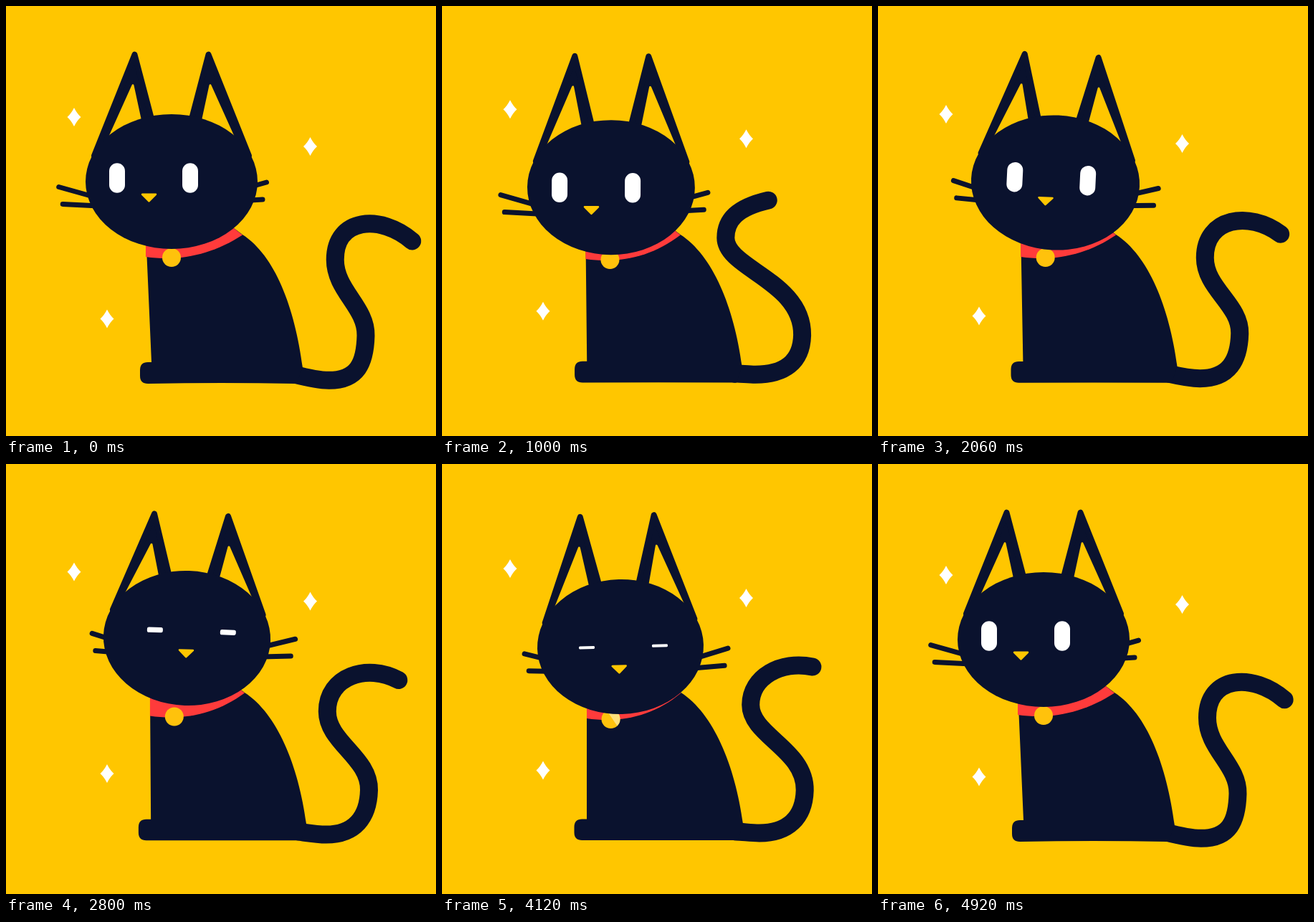
An HTML page with a canvas for the animation above (4.94 s loop, 600 px wide and 600 px high).

```html
<!DOCTYPE html>
<html lang="en">
<head>
<meta charset="utf-8">
<title>Black cat</title>
<style>
html, body { margin: 0; width: 100%; height: 100%; overflow: hidden; background: #ffc600; }
canvas { display: block; width: 600px; height: 600px; }
</style>
</head>
<body>
<canvas id="stage"></canvas>
<script>
const LOOP = 4940, HALF = LOOP / 2;
const YELLOW = '#ffc600', INK = '#0a122e', RED = '#ff3b3b', GOLD = '#ffc20c', WHITE = '#fff';

const canvas = document.getElementById('stage');
const c = canvas.getContext('2d');
const dpr = window.devicePixelRatio || 1;
canvas.width = canvas.height = 600 * dpr;

// time, head x, head y, tilt in degrees, look x, look y, body sway, collar y
const POSES = [
  [0, 231, 245, 0, -25, -5, 0, 351],
  [560, 234, 253.5, -.5, -24, .5, .55, 354],
  [1080, 236.5, 253, .5, -20, .5, .8, 354],
  [1440, 246, 249.5, 2.8, -13.7, -1.5, .95, 353],
  [2060, 247.5, 246.5, 2.8, -6, -5, .6, 351],
  [2800, 252.5, 243, 2, 6, -10, .85, 352.5],
  [3500, 252, 250, .3, 8, -4, .95, 354],
  [4120, 249, 255, -1.5, 4, 0, 1, 356],
  [4320, 238, 254, -1, -15, -1, .8, 355],
  [4600, 231.5, 249, 0, -25, -3, .3, 352.5]
];
const FLOAT = [[0, 155], [330, 150.5], [560, 148], [1240, 143.4], [1440, 144], [1650, 146], [2060, 151]];
const BLINKS = [1500, 2830, 4120];

// Smooth periodic interpolation without overshoot
function sample(keys, period, t) {
  t %= period;
  const n = keys.length;
  const key = i => {
    const turn = Math.floor(i / n), k = keys[i - turn * n];
    return [k[0] + turn * period, ...k.slice(1)];
  };
  let i = 0;
  while (key(i + 1)[0] <= t) i++;
  const [a, b, d, e] = [i - 1, i, i + 1, i + 2].map(key);
  const h = d[0] - b[0], u = (t - b[0]) / h;
  const slope = (p, q, j) => (q[j] - p[j]) / (q[0] - p[0]);
  const tangent = (m, k) => m * k > 0 ? 2 * m * k / (m + k) : 0;
  return b.slice(1).map((v, m) => {
    const j = m + 1, s = slope(b, d, j);
    const t0 = tangent(slope(a, b, j), s) * h, t1 = tangent(s, slope(d, e, j)) * h;
    const gap = d[j] - v;
    return v + t0 * u + (3 * gap - 2 * t0 - t1) * u * u + (t0 + t1 - 2 * gap) * u * u * u;
  });
}

function fill(color, path) {
  c.fillStyle = color;
  c.fill(new Path2D(path));
}

function stroke(color, width, path) {
  c.strokeStyle = color;
  c.lineWidth = width;
  c.stroke(new Path2D(path));
}

function blob(color, width, path) {
  fill(color, path);
  stroke(color, width, path);
}

function star(x, y) {
  c.save();
  c.translate(x, y);
  fill(WHITE, 'M0-13Q4-5 9.5 0Q4 5 0 13Q-4 5-9.5 0Q-4-5 0-13Z');
  c.restore();
}

function drawTail(t, look, sway) {
  const s = Math.cos((t + 130) / HALF * 2 * Math.PI);
  const turn = (look + 25) / 31;
  const lowX = 444 + 7 * s, lowY = 518.5 + 4 * s - 3 * turn;
  const outX = 502 + 4.5 * turn, outY = 460 - 5 * turn;
  const bendX = 437 + 33 * s - 10 * s * s, bendY = 339 + 16 * s;
  const tipX = 528 + 58 * s - 18 * s * s, tipY = 288 + 30 * s + 13 * s * s;
  stroke(INK, 25, `M${402 + 8 * sway} ${514 - sway}
    C${lowX - 24} ${lowY - 2} ${lowX - 12} ${lowY} ${lowX} ${lowY}
    C${lowX + 40} ${lowY} ${outX - 1} ${outY + 38} ${outX} ${outY}
    C${outX + 1} ${402 + 19 * s} ${bendX} ${bendY + 43} ${bendX} ${bendY}
    C${bendX} ${bendY - 42 - 18 * s} ${tipX - 44} ${tipY - 14 - 25 * s} ${tipX} ${tipY}`);
}

function drawBody(sway, collar) {
  const left = 195 + 7 * sway, neck = 330 + 3.5 * sway, rump = 414 + 6 * sway;
  const paw = 187 - 2.5 * sway, top = 497 - 1.5 * sway, base = 527 - 2 * sway;
  fill(INK, `M${left} 315L${203 - sway} ${top}H${paw + 11}Q${paw} ${top} ${paw} ${top + 11}
    V${base - 11}Q${paw} ${base} ${paw + 11} ${base}
    Q300 ${base - 2 + 2 * sway} ${405 + 8 * sway} ${base}L${rump} ${505 - 3 * sway}
    C${rump - 11} 420 ${neck + 45} 348 ${neck} 319L${neck - 20} 304Z`);
  const y = collar - 1;
  fill(RED, `M${left} 315V${y}C${left + 49} ${y + 7} ${left + 94} ${y - 4} ${neck} 319.5L${neck - 20} 304Z`);
}

function drawBell(t, x, y) {
  c.save();
  c.translate(x, y);
  c.beginPath();
  c.arc(0, 0, 13, 0, 7);
  c.fillStyle = GOLD;
  c.fill();
  c.clip();
  // Passing glint
  c.rotate(-.6);
  c.fillStyle = '#ffe07a';
  c.fillRect(2 + (t - 4120) * .12, -15, 13, 30);
  c.restore();
}

function drawHead(t, [x, y, tilt, lookX, lookY, sway]) {
  const rx = 120 - 4 * sway, tipY = -182.5 - 1.05 * lookY;
  c.save();
  c.translate(x, y);
  c.rotate(tilt * Math.PI / 180);

  for (const side of [1, -1]) {
    c.save();
    c.scale(side, 1);
    blob(INK, 8, `M${.9 * rx}-36L51.5 ${tipY}L21-61Z`);
    blob(YELLOW, 3, `M54 ${tipY + 43}L96-41L38-60Z`);
    c.restore();
  }

  const lx = -137.3 + .8 * lookX, ly = 7 + .8 * lookY - .18 * lookX;
  const wx = 147.5 + .6 * lookX, wy = 6 + lookY;
  stroke(INK, 7, `M${lx} ${ly}l50 14M${lx + 5.5} ${ly + 24}l50 2.5
    M${wx} ${wy}l-50 14M${wx - 5.5} ${wy + 24}l-50 3`);

  c.beginPath();
  c.ellipse(0, 0, rx, 94, 0, 0, 7);
  c.fillStyle = INK;
  c.fill();

  const gap = Math.min(1, ...BLINKS.map(b => Math.abs(t - b) / 160));
  const h = 4 + 37.5 * gap * gap * (3 - 2 * gap);
  c.fillStyle = WHITE;
  for (const side of [-1, 1]) {
    c.beginPath();
    c.roundRect(lookX + side * 51 - 11, lookY - h / 2, 22, h, Math.min(11, h * .35 + 0));
    c.fill();
  }

  const nx = lookX - 6.5, ny = lookY + 31 - 4 * (1 - Math.min(1, sway * 2));
  blob(YELLOW, 2.5, `M${nx - 9.5} ${ny - 4.2}H${nx + 9.5}L${nx} ${ny + 5.3}Z`);
  c.restore();
}

function draw(now) {
  const t = now % LOOP;
  const pose = sample(POSES, LOOP, t);
  const [, , , look, , sway, collar] = pose;
  const [floatY] = sample(FLOAT, HALF, t);

  c.setTransform(dpr, 0, 0, dpr, 0, 0);
  c.lineCap = c.lineJoin = 'round';
  c.fillStyle = YELLOW;
  c.fillRect(0, 0, 600, 600);
  star(95, floatY);
  star(424.5, floatY + 41);
  star(141, floatY + 281.5);
  drawTail(t, look, sway);
  drawBody(sway, collar);
  drawBell(t, 231 + 4.5 * sway, collar);
  drawHead(t, pose);
}

const start = performance.now();
function tick() {
  draw(performance.now() - start);
  requestAnimationFrame(tick);
}
tick();
</script>
</body>
</html>
```
